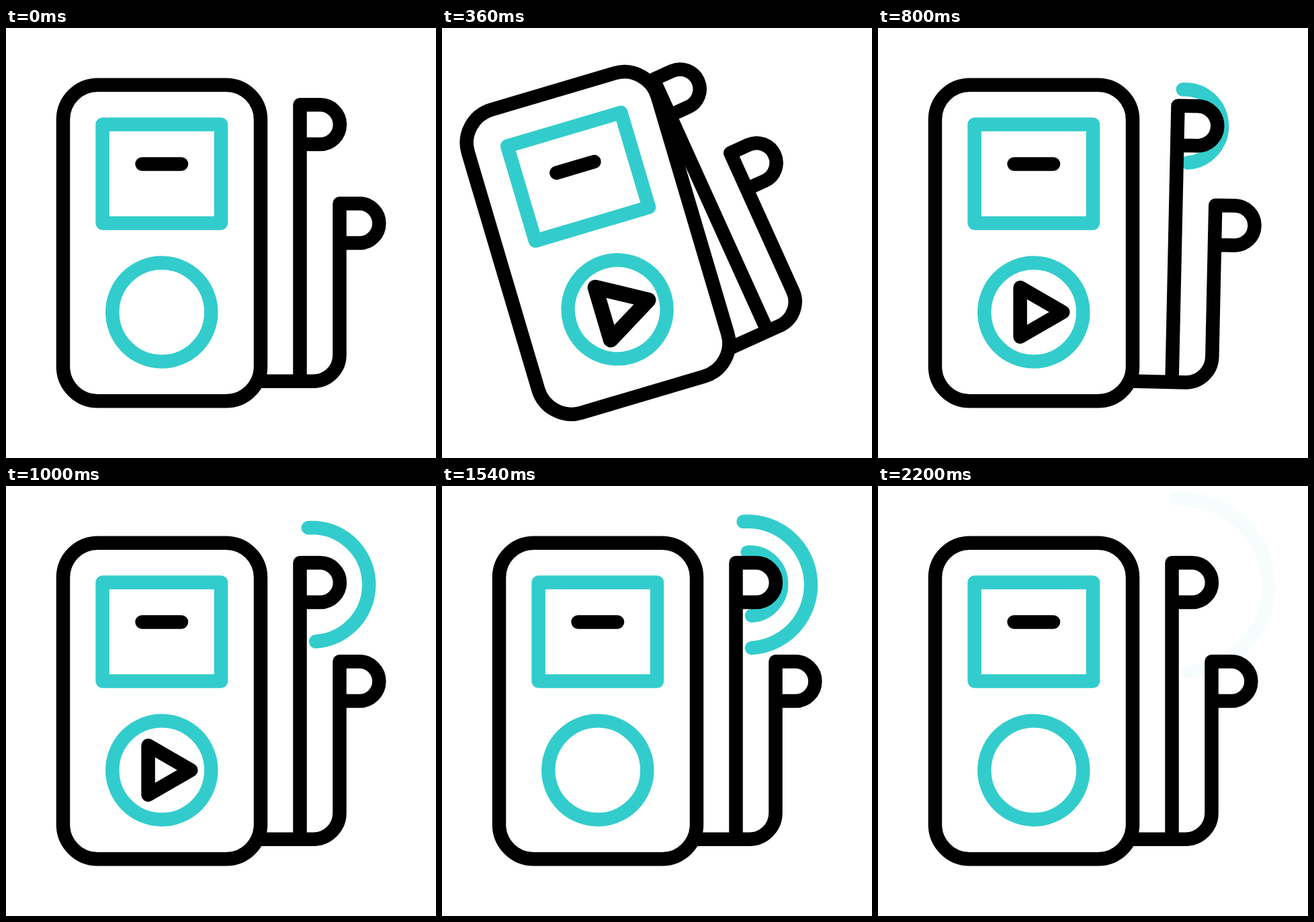
An HTML page that plays this animation: 640 px wide and 640 px high, repeating every 2400 ms.

```html
<!DOCTYPE html>
<html lang="en">
<head>
<meta charset="utf-8">
<title>Music player</title>
<style>
  html, body { margin: 0; width: 100%; height: 100%; overflow: hidden; background: #fff; }
  svg { display: block; width: 100vw; height: 100vh; fill: none; stroke: #000; stroke-width: 20.5; stroke-linejoin: round; }
  .teal { stroke: #3cc; }
  .round { stroke-linecap: round; }
</style>
</head>
<body>
<svg viewBox="0 0 640 640">
  <g id="player">
    <g id="waves" class="teal round"></g>
    <g id="earphones">
      <path d="M374 525.7H457.5A39 39 0 0 0 496.5 486.7V261.3H526a29.4 29.4 0 0 1 0 58.8H496.5"/>
      <path d="M437.5 526V114.3H467.5a29.4 29.4 0 0 1 0 58.8H437.5"/>
    </g>
    <rect x="85" y="84.7" width="294" height="470.6" rx="51.5" fill="#fff"/>
    <rect class="teal" x="143.6" y="143.5" width="176.4" height="147"/>
    <path class="round" d="M202.5 202.4H261"/>
    <circle class="teal" cx="231.8" cy="423" r="73.5"/>
    <path id="play" d="M211.6 386.2L275.2 422.8L211.6 459.6Z"/>
  </g>
</svg>
<script>
const LOOP = 2400, LAST = 2200, STEP = 20;

// [time, value] keys, eased between neighbours
const BODY = [[0, 0], [335, -17.4], [555, 8], [775, 0]];
const SWING = [[0, 0], [335, -8.1], [640, 3.8], [900, 0]];
const PLAY = [[80, 0], [350, 1.11], [500, 1], [1120, 1], [1250, 1.11], [1500, 0]];
const WAVE_STARTS = [228, 702, 1017];
const WAVE_TIME = 1290;

const $ = id => document.getElementById(id);
const clamp = x => Math.min(1, Math.max(0, x));
const ramp = (x, a, b) => clamp((x - a) / (b - a));
const ease = u => u * u * (3 - 2 * u);

function track(keys, t) {
  let value = keys[0][1];
  for (let i = 1; i < keys.length; i++) {
    const [t0, v0] = keys[i - 1], [t1, v1] = keys[i];
    if (t > t0) value = v0 + (v1 - v0) * ease(ramp(t, t0, t1));
  }
  return value;
}

const waves = WAVE_STARTS.map(start => {
  const el = document.createElementNS('http://www.w3.org/2000/svg', 'path');
  $('waves').append(el);
  return { el, start };
});

function drawWave({ el, start }, t) {
  const u = clamp((t - start) / WAVE_TIME), s = ease(u), r = 131.2 * s;
  el.setAttribute('opacity', ramp(u, 0.24, 0.3) * (1 - ramp(u, 0.69, 0.925)));
  el.setAttribute('d', `M${461 - 17.3 * s} ${144.5 - 127.5 * s}A${r} ${r} 0 0 1 461 ${144.5 + 134.6 * s}`);
}

function draw(t) {
  $('player').setAttribute('transform', `rotate(${track(BODY, t)} 232 320)`);
  $('earphones').setAttribute('transform', `rotate(${track(SWING, t)} 378 526)`);
  $('play').setAttribute('transform', `translate(232 423) scale(${track(PLAY, t)}) translate(-232 -423)`);
  waves.forEach(w => drawWave(w, t));
}

const origin = performance.now();
function tick() {
  const t = (performance.now() - origin) % LOOP;
  draw(Math.min(LAST, Math.floor(t / STEP) * STEP));
  requestAnimationFrame(tick);
}
tick();
</script>
</body>
</html>
```
